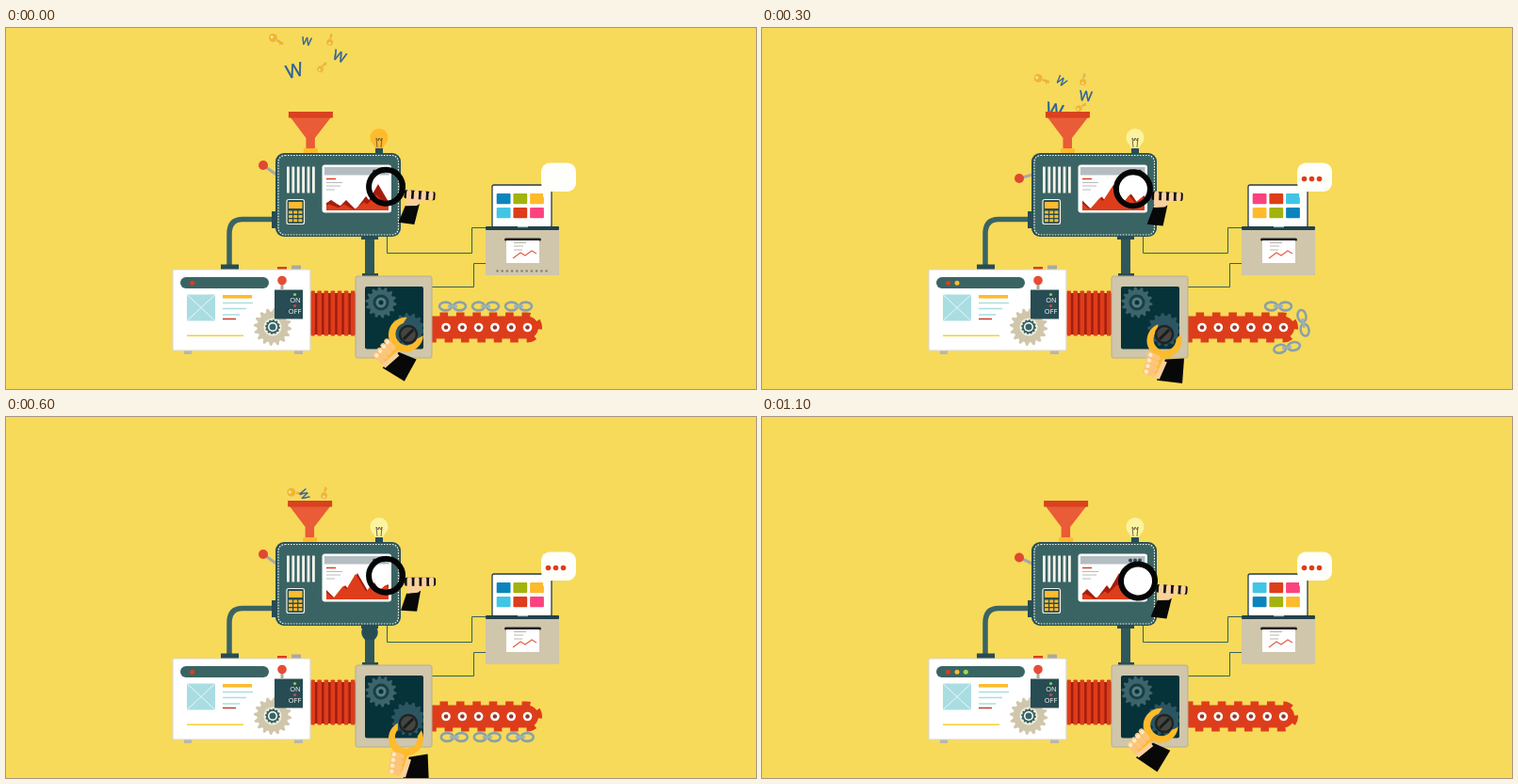
Recreate the animation shown at these times as an HTML page. Size 796x384 px, loop 1200 ms.

```html
<!DOCTYPE html>
<html lang="en">
<head>
<meta charset="utf-8">
<title>Idea machine</title>
<style>
  html, body { margin: 0; width: 100%; height: 100%; overflow: hidden; background: #f7da59; }
  svg { display: block; width: 796px; height: 384px; }
  text { font-family: "Open Sans", "Noto Sans", sans-serif; }
</style>
</head>
<body>
<svg id="stage" viewBox="0 0 796 384" xmlns="http://www.w3.org/2000/svg"></svg>
<script>
const TEAL = '#3a6464', DARK = '#284c53', RED = '#dd3d1b', DEEP = '#a51d0f',
      GOLD = '#fdbb2d', SAND = '#cfc6ab', SKIN = '#fad09d';
const STEP_MS = 100, STEPS = 12;

// ---- drawing helpers ----
const rect = (x, y, w, h, fill, rx = 0, more = '') =>
  `<rect x="${x}" y="${y}" width="${w}" height="${h}" rx="${rx}" fill="${fill}" ${more}/>`;
const circle = (x, y, r, fill, more = '') =>
  `<circle cx="${x}" cy="${y}" r="${r}" fill="${fill}" ${more}/>`;
const path = (d, fill, more = '') => `<path d="${d}" fill="${fill}" ${more}/>`;
const line = (d, color, width, more = '') =>
  path(d, 'none', `stroke="${color}" stroke-width="${width}" ${more}`);
const group = (id, body = '') => `<g id="${id}">${body}</g>`;
const clipped = (id, body) => `<g clip-path="url(#${id})">${body}</g>`;
const repeat = (n, fn) => Array.from({ length: n }, (_, i) => fn(i)).join('');

function gear(x, y, r, teeth, depth, fill) {
  const points = repeat(teeth * 4, i => {
    const a = (i + 0.5) / (teeth * 4) * Math.PI * 2;
    const d = i % 4 < 2 ? r : r - depth;
    return (i ? 'L' : 'M') + (x + d * Math.cos(a)).toFixed(1) + ' ' + (y + d * Math.sin(a)).toFixed(1);
  });
  return path(points + 'Z', fill);
}

// ---- parts of the scene ----
function wires() {
  return line('M404.5 222V239.500H494.500V212.500H509M452 275.500H496.500V250.500H509', '#35605f', 1)
    + line('M286 203.500H251Q237 203.500 237 219V253', TEAL, 5.5)
    + rect(282, 195, 6, 18, DARK) + rect(228, 251.5, 19, 5.5, DARK);
}

function desk() {
  return rect(516, 167, 63, 45, '#fff', 2, 'stroke="#273c50" stroke-width="1.3"')
    + group('tiles')
    + rect(509, 215, 78, 48, SAND) + rect(509, 211, 78, 4, '#24414b', 1)
    + rect(543, 211, 11, 1.2, '#9fc4c6')
    + rect(529, 223.5, 39, 3, '#222', 1.5) + rect(531, 226, 35, 24, '#fff')
    + line('M539 228.500H552M539 232H549M539 236H548', '#b5b5b0', 1)
    + line('M538 245L546 239L551 242L558 237L563 240', '#e2604c', 1.2)
    + group('feed', repeat(11, i => circle(521.5 + i * 5.2, 258.5, 1.2, '#837e70')))
    + path('M570 170V180Q577 177 580 172Z', '#fdfdf6')
    + rect(568, 143.5, 37, 30.5, '#fefefa', 9)
    + group('typing', repeat(3, i => circle(575.5 + i * 8, 160.5, 2.8, RED)));
}

function browserBox() {
  return rect(288, 254, 10, 4, RED) + rect(303, 252.5, 10, 5, '#aaa99f')
    + rect(189, 342, 8, 5, '#b9b7a8') + rect(306, 342, 9, 5, '#b9b7a8')
    + rect(177, 257, 146, 86, '#fff', 1, 'stroke="#dcd8cb" stroke-width="1.2"')
    + rect(185, 265, 94, 12, TEAL, 6) + group('lights')
    + rect(192, 283.5, 30, 28, '#a9dde2')
    + line('M192 283.500L222 311.500M222 283.500L192 311.500', '#e9f8f8', 1)
    + rect(230, 284, 31, 3.6, GOLD)
    + line('M230 292.500H262M230 298.500H255M230 305H248', '#a9dde2', 1.5)
    + line('M230 309.500H244', '#c8392a', 1.5) + line('M192 327.300H252', '#f3d135', 1.6)
    + gear(283, 318, 20, 16, 3.5, SAND)
    + circle(283, 318, 9.5, '#f3efe0') + gear(283, 318, 8, 12, 1.2, TEAL)
    + circle(283, 318, 5, '#fff') + circle(283, 318, 3.5, TEAL)
    + rect(285, 278.5, 30, 31, DARK)
    + line('M293 270V279', '#a9a9a0', 3) + circle(293, 268.5, 4.8, '#e64c35')
    + circle(306.5, 283.5, 1.6, '#8bd24a') + circle(306.5, 295.5, 1.6, '#d9482f')
    + '<g fill="#fff" font-size="7.5" text-anchor="middle">'
    + '<text x="307" y="292">ON</text><text x="306.5" y="304">OFF</text></g>';
}

function bellows() {
  return rect(323, 282, 48, 44, DEEP)
    + repeat(7, i => rect(323.3 + i * 7.1, 279.5, 4.6, 48, RED, 1));
}

function mainMachine() {
  return rect(286, 133, 133, 89, DARK, 9) + rect(288, 134.5, 129.5, 86, TEAL, 8)
    + rect(289, 135.5, 127.5, 84.5, 'none', 7,
        'stroke="#f4f6ee" stroke-width="1.2" stroke-dasharray="1.5 1.5"')
    + repeat(6, i => rect(298 + i * 5.4, 147.5, 2.8, 28, '#f3f3ea'))
    + rect(298, 182.5, 18.5, 26, DARK, 2, 'stroke="#f3f3ea" stroke-width="1.2"')
    + rect(300, 185, 14.5, 7, GOLD)
    + repeat(9, i => rect(300 + i % 3 * 5.2, 194.5 + Math.floor(i / 3) * 4.4, 4, 3, GOLD, 0.5))
    + rect(335.5, 145.5, 73.5, 51, '#fff', 3) + rect(338, 148, 68.5, 8.5, '#b4bdc2')
    + repeat(3, i => circle(391 + i * 5, 152.5, 2, DARK))
    + line('M340 160.500H350', RED, 1.5)
    + line('M340 164.500H357M340 168H355M340 172H349', '#b9b9b9', 1)
    + clipped('screen', path('', DEEP, 'id="chartBack"') + path('', RED, 'id="chart"'));
}

function bulb() {
  return path('M391.5 128C391.5 124 386.5 123 386.5 116.5A9.5 9.5 0 0 1 405.5 116.5C405.5 123 400.5 124 400.5 128Z', GOLD, 'id="bulb"')
    + line('M394 127L393 117L395 120L396 117L398 120L399 117L398 127', '#6b5a35', 0.9)
    + rect(392, 128, 8, 5.5, DARK);
}

function funnel() {
  return rect(317, 128, 15, 5, GOLD)
    + path('M303 95H346L329 117V128H319.5V117Z', '#ea5b38') + rect(301, 89, 47, 6.5, '#d8421f');
}

function gearBox() {
  return rect(371, 264, 81, 87, SAND, 2, 'stroke="#b8ae91" stroke-width="1"')
    + rect(381, 275, 62, 66.5, '#06323a', 2)
    + clipped('window', gear(427, 321, 18, 14, 3, '#2b5560')
      + gear(398, 292, 16.5, 14, 3, '#3d646a') + circle(398, 292, 8.5, '#163f48')
      + circle(398, 292, 5.5, '#567b80') + circle(398, 292, 2.5, '#06323a'));
}

const bolt = () => circle(427, 326, 9, '#454641', 'stroke="#202324" stroke-width="2.5"')
  + line('M422 331L432 321', '#191d1e', 3);

const TRACK = 'M452 306.500H553A12 12 0 0 1 553 330.500H452';
function conveyor() {
  return line(TRACK, RED, 8, 'id="teeth" stroke-dasharray="8.6 8.8"')
    + path(TRACK + 'Z', RED)
    + repeat(6, i => {
      const x = 467 + i * 17.3;
      return circle(x, 318.5, 4.8, '#fff') + circle(x, 318.5, 2.3, '#8d3a2c');
    });
}

function magnifier() {
  return circle(0, 0, 18, '#fff', 'id="glass"')
    + circle(0, 0, 18, 'none', 'stroke="#050505" stroke-width="6"')
    + path('M22 19L37 16L33 38L16 37Z', '#080808')
    + path('M23 8H40Q37 17 34 18L23 19Z', SKIN)
    + rect(20, 2, 33, 9, '#0b0b0b', 2)
    + repeat(4, i => rect(22.5 + i * 7.8, 1.5, 5.2, 13 - i, SKIN, 2.5));
}

function wrench() {
  return path('M9 18L27 9L36 34L10 42Z', '#080808')
    + path('M-4 20H12V40H-4Z', SKIN)
    + rect(-7, 12, 14, 26, GOLD, 4)
    + path('M-13 -13A18.5 18.5 0 1 0 13 -13L11 -6A12 12 0 1 1 -11 -6Z', GOLD)
    + repeat(4, i => rect(-11 + i, 17 + i * 6, 15, 5.8, '#fcc57c', 2.9)
      + circle(-7 + i, 20 + i * 6, 2.2, '#ffe9cb'));
}

const key = size => `<g transform="scale(${size})" stroke="#efe0a4" stroke-width=".6">`
  + path('M0 -1.8H10V1.8H8V3.6H6V1.8H0Z', '#f0b427') + circle(-3, 0, 5, '#f3b62b')
  + circle(-4.5, 0, 1.3, '#fae7a5') + '</g>';
const letter = size =>
  `<text font-size="${size}" text-anchor="middle" y="${size * 0.36}" fill="#2d5f9c" stroke="#2d5f9c" stroke-width=".4">W</text>`;

const pairOfLinks = '<g fill="none" stroke="#8aa1a8" stroke-width="2.6">'
  + '<ellipse cx="-7.5" rx="6.5" ry="4.4"/><ellipse cx="7.5" rx="6.5" ry="4.4"/></g>'
  + line('M-5 0H5', '#9db2b8', 2.6);

// ---- motion ----
const falling = [
  { art: key(1), x: 286, y: 12, drift: 3.3, turn: 32, spin: -4 },
  { art: letter(11.5), x: 319, y: 14, drift: -0.4, turn: 10, spin: 9 },
  { art: key(0.75), x: 344, y: 13, drift: -1, turn: -80, spin: 0 },
  { art: letter(15), x: 354, y: 30, drift: -3.5, turn: 22, spin: -5 },
  { art: key(0.75), x: 335, y: 42, drift: 1, turn: -50, spin: 5 },
  { art: letter(20), x: 306, y: 45, drift: 1.5, turn: -14, spin: 9 }
];
const drop = step => 72 * Math.sin(Math.min(1, step / 7.5) * Math.PI / 2);

const wave = (step, mid, reach, peak, period = STEPS) =>
  mid + reach * Math.cos((step - peak) / period * Math.PI * 2);

// Straight runs between a few [step, value] points.
function along(points, step) {
  const i = Math.max(1, points.findIndex(p => p[0] >= step));
  const [s0, v0] = points[i - 1], [s1, v1] = points[i];
  return v0 + (v1 - v0) * (step - s0) / (s1 - s0);
}
const chainRun = [[0, 474], [2, 496], [4, 600], [7, 644], [11, 780]];
const peakRun = [[0, 395], [2, 388], [4, 359], [6, 373], [11, 379]];

// Place on the belt's outer path: right along the top, around the end, back below.
function onBelt(s) {
  const r = 22, bend = 553, arc = Math.PI * r;
  if (s < bend) return [s, 296, 0];
  if (s > bend + arc) return [bend * 2 + arc - s, 340.5, 180];
  const a = (s - bend) / r;
  return [bend + r * Math.sin(a), 318.3 - r * Math.cos(a), a * 180 / Math.PI];
}

// Each hill: distance from the main peak, height, half width.
const hills = [[-50, 9, 14], [-34, 9, 9], [-13, 13, 10], [0, 26, 15], [18, 16, 11], [32, 14, 15]];
const ridge = dx => 2 + Math.max(0, ...hills.map(([c, h, w]) => h * (1 - Math.abs(dx - c) / w)));
const skyline = (peak, scale) => 'M338 196'
  + repeat(71, i => `L${338 + i} ${(194 - scale * ridge(338 + i - peak)).toFixed(1)}`) + 'V196Z';

const stage = document.getElementById('stage');
const clip = (id, shape) => `<clipPath id="${id}">${shape}</clipPath>`;
stage.innerHTML = '<defs>' + clip('screen', rect(340, 157, 66, 37))
  + clip('window', rect(381, 275, 62, 66)) + clip('above', rect(0, 0, 796, 89.5)) + '</defs>'
  + rect(0, 0, 796, 384, '#f7da59')
  + wires() + desk() + bellows() + browserBox()
  + clipped('above', falling.map((f, i) => group('fall' + i, f.art)).join(''))
  + group('funnel', funnel())
  + line('', '#a7a9a5', 3.2, 'id="arm"') + circle(273, 146, 5, '#e0482f', 'id="knob"')
  + rect(381, 222, 10, 42, '#2f585c') + path('', DARK, 'id="bulge"')
  + rect(377, 221, 18, 4, DARK) + rect(378, 261, 17, 3.5, DARK)
  + bulb() + mainMachine()
  + conveyor() + repeat(3, i => group('link' + i, pairOfLinks))
  + gearBox() + group('lens', magnifier()) + group('wrench', wrench()) + bolt();

const part = {};
stage.querySelectorAll('[id]').forEach(el => part[el.id] = el);
const place = (el, x, y, turn = 0) =>
  el.setAttribute('transform', `translate(${x} ${y}) rotate(${turn})`);
const show = (el, on) => el.setAttribute('visibility', on ? 'visible' : 'hidden');

const colors = ['#0b84bd', '#a3b30d', GOLD, '#41c5e5', RED, '#fb427f'];
const tileOrders = [i => i, i => 5 - i, i => (i + 3) % 6];

function draw(step) {
  const lit = step % 4 > 1, phase = Math.floor(step / 2) % 3;
  show(part.typing, lit);
  show(part.feed, !lit);
  part.bulb.setAttribute('fill', lit ? '#fbf3a0' : GOLD);
  part.tiles.innerHTML = repeat(6, i => rect(520.7 + i % 3 * 17.7, i < 3 ? 176 : 191,
    14.8, 11.3, colors[tileOrders[phase](i)], 1));
  part.lights.innerHTML = repeat(phase + 1, i =>
    circle(197.7 + i * 9.3, 271.3, 2.5, [RED, GOLD, '#9bdd4b'][i]));

  falling.forEach((f, i) => {
    place(part['fall' + i], f.x + f.drift * step, f.y + drop(step), f.turn + f.spin * step);
    show(part['fall' + i], step < 8);
  });
  place(part.funnel, wave(step, -1.5, 1.5, 2.5), 0);
  place(part.lens, wave(step, 398.5, 5, 0.4, 6), wave(step, 170, -6, 1.3, 6), wave(step, 2, 2, 0));
  place(part.wrench, wave(step, 424.5, 2.5, 3), wave(step, 334, -8, 0.4), wave(step, 33, 18, -1));
  show(part.glass, step > 7);

  const knobY = wave(step, 153, -7, 0, 6);
  part.knob.setAttribute('cy', knobY);
  part.arm.setAttribute('d', `M273 ${knobY}L287 156`);

  const peak = along(peakRun, step);
  part.chartBack.setAttribute('d', skyline(peak, 1));
  part.chart.setAttribute('d', skyline(peak - 2, wave(step, 0.78, 0.22, 5)));

  const y = 229 + (step - 6) * 10.5;
  show(part.bulge, step > 5 && step < 10);
  part.bulge.setAttribute('d', `M381 ${y - 8}C376 ${y - 3} 376 ${y + 3} 381 ${y + 8}H391C396 ${y + 3} 396 ${y - 3} 391 ${y - 8}Z`);

  part.teeth.setAttribute('stroke-dashoffset', -8.5 - step * 11.6);
  const tail = along(chainRun, step);
  for (let i = 0; i < 3; i++) {
    const spot = onBelt(tail + i * 35);
    place(part['link' + i], ...spot);
    show(part['link' + i], spot[0] > 445);
  }
}

const start = performance.now();
let last = -1;
function tick() {
  const step = Math.floor((performance.now() - start) / STEP_MS) % STEPS;
  if (step !== last) draw(last = step);
  requestAnimationFrame(tick);
}
tick();
</script>
</body>
</html>
```
